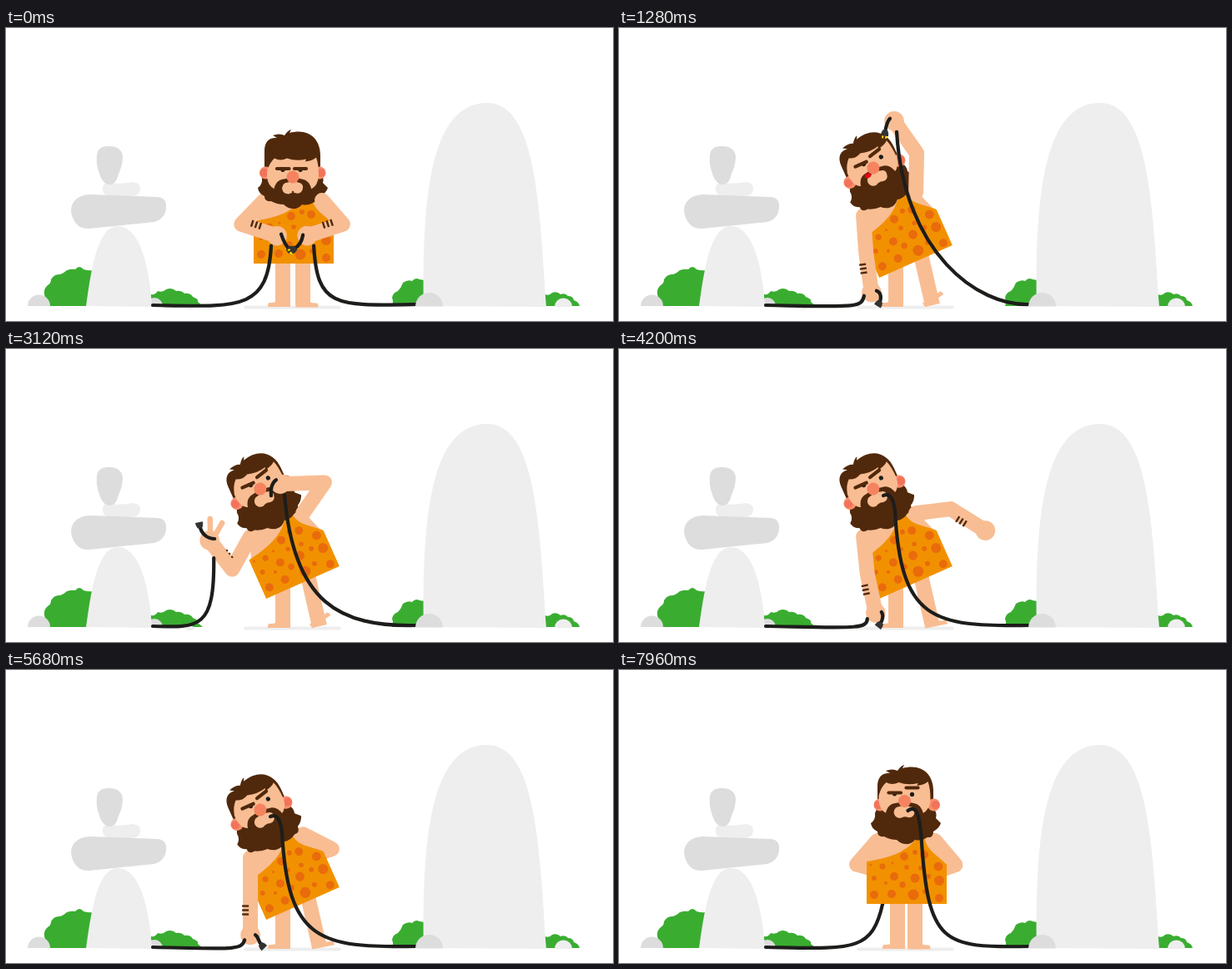
Animation, 728 px wide and 352 px high, one loop 8 s. Source, as an HTML page with a canvas:

```html
<!DOCTYPE html>
<html lang="en">
<head>
<meta charset="utf-8">
<title>Caveman and cables</title>
<style>
  html, body { margin: 0; width: 100%; height: 100%; overflow: hidden; background: #fff; }
  canvas { display: block; width: 728px; height: 352px; }
</style>
</head>
<body>
<canvas id="stage" width="728" height="352"></canvas>
<script>
const ctx = document.getElementById('stage').getContext('2d');
const LOOP = 8000;
const C = {
  skin: '#f8bd93', orange: '#f29100', spot: '#e96b0c', hair: '#50290c', nose: '#f5835f',
  ear: '#f78f6c', earIn: '#f2735a', red: '#e30613', cable: '#1d1d1b', plug: '#333', yellow: '#ffde00',
  light: '#eeeeee', grey: '#dddddd', green: '#3aad31'
};

// ---- drawing helpers
function fill(color, d) { ctx.fillStyle = color; ctx.fill(new Path2D(d)); }
function disc(color, x, y, rx, ry = rx) {
  ctx.fillStyle = color;
  ctx.beginPath();
  ctx.ellipse(x, y, rx, ry, 0, 0, 7);
  ctx.fill();
}
function dome(color, x, y, r) {
  ctx.fillStyle = color;
  ctx.beginPath();
  ctx.arc(x, y, r, Math.PI, 0);
  ctx.fill();
}
function line(color, width, points, cap = 'round') {
  ctx.strokeStyle = color;
  ctx.lineWidth = width;
  ctx.lineCap = cap;
  ctx.lineJoin = 'round';
  ctx.beginPath();
  points.forEach(([x, y]) => ctx.lineTo(x, y));
  ctx.stroke();
}
function curve(x, y, c) {
  ctx.strokeStyle = C.cable;
  ctx.lineWidth = 4.2;
  ctx.lineCap = 'round';
  ctx.beginPath();
  ctx.moveTo(x, y);
  ctx.bezierCurveTo(...c);
  ctx.stroke();
}
function at(x, y, deg, draw) {
  ctx.save();
  ctx.translate(x, y);
  ctx.rotate(deg * Math.PI / 180);
  draw();
  ctx.restore();
}
const polar = ([x, y], deg, len) =>
  [x + len * Math.cos(deg * Math.PI / 180), y + len * Math.sin(deg * Math.PI / 180)];
const offset = ([x, y], list) => list.map((v, i) => v + (i % 2 ? y : x));

// ---- motion: [time, values] keys with eased moves between them
const ease = u => u * u * (3 - 2 * u);
function sample(keys, t) {
  const i = keys.findIndex(k => k[0] > t);
  if (i === 0) return keys[0][1];
  if (i < 0) return keys[keys.length - 1][1];
  const [t0, a] = keys[i - 1], [t1, b] = keys[i];
  const u = ease((t - t0) / (t1 - t0));
  return a.map((v, n) => v + (b[n] - v) * u);
}
const between = (t, a, b) => t >= a && t < b;

// x, y, lean, head drop, look down
const bow = [345, 283, 0, 6, 1], lean = [356, 280.5, -24, 0, 0], stand = [345, 281, 0, 0, 0];
const body = [[160, bow], [660, lean], [6020, lean], [6420, stand]];

// left leg, right hip, right ankle, foot lift
const legs = [
  [160, [332, 356, 356, 0]], [660, [332, 362, 376, -36]], [3520, [332, 362, 376, -36]],
  [3800, [332, 362, 376, -11]], [6020, [332, 362, 376, -11]], [6420, [334, 355, 355, 0]]
];

// upper arm angle and length, forearm angle and length, bracelet side
const R = {
  plug: [49, 38, 162, 45, 6], high: [-89, 47, 235, 47, 15], bite: [-55, 45, 178, 53, 15],
  out: [-7, 42, 392, 49, 6], hip: [27, 39, 521, 22, 6], back: [50, 38, 520, 22, 6]
};
const rightArm = [
  [160, R.plug], [720, R.high], [1340, R.high], [1720, R.bite], [3440, R.bite],
  [3920, R.out], [4240, R.out], [4680, R.hip], [6020, R.hip], [6420, R.back]
];
const L = {
  plug: [134, 40, 18, 45, -5], down: [86, 45, 82, 48, 6], raised: [119, 45, 232, 44, 12],
  low: [84, 45, 78, 48, 6], hang: [90, 45, 90, 48, 6], back: [131, 38, 15, 22, 6]
};
const leftArm = [
  [160, L.plug], [660, L.down], [2560, L.down], [3000, L.raised], [3400, L.raised],
  [3800, L.low], [4280, L.low], [4900, L.hang], [6020, L.hang], [6420, L.back]
];

// first control x, second control, end, then the loose stub; all but the first follow the hand
const LC = {
  plug: [280, -11, 90, -7, 12, 5, -2, 7, 4, 10, 12, 15, 16],
  down: [282, -12, 19, -9, 4, 6, -2, 12, 0, 12, 8, 9, 13],
  raised: [232, 6, 106, 5, 21, 6, -2, -3, -2, -10, -8, -12, -18],
  low: [280, -10, 20, -10, 7, 7, -1, 10, 3, 8, 10, 5, 14],
  hang: [268, -10, 19, -7, 6, 6, 0, 10, 2, 9, 8, 14, 13],
  back: [280, -3, 100, 10, 41, 6, 0, 10, 2, 9, 8, 14, 13]
};
const leftCable = leftArm.map(([t, pose]) => [t, LC[Object.keys(L).find(k => L[k] === pose)]]);
const RC = {
  plug: [395, 12, 86, 8, 12, -5, -1, -6, 6, -9, 12, -16, 16],
  high: [430, 12, 159, 3, 13, -5, -3, -9, 1, -10, 7, -11, 14],
  bite: [400, 16, 143, 5, 13, -5, -5, -10, -2, -12, 6, -11, 14],
  mouth: [375, 23, 149, 16, 19, 16, 19, 14, 0, 8, -3, 2, 0],
  back: [388, 22, 161, 14, 31, 14, 31, 12, 8, 9, -8, -2, 0]
};
const rightCable = [
  [160, RC.plug], [720, RC.high], [1340, RC.high], [1720, RC.bite], [3440, RC.bite],
  [3540, RC.mouth], [6020, RC.mouth], [6420, RC.back]
];
const hold = [[3440, [1]], [3540, [0]]];

// brow lift, brow tilt, gaze, face shift
const face = [
  [160, [0, 0, 0, 0]], [620, [6, -14, 5, 0]], [6020, [6, -14, 5, 0]], [6380, [0, 0, 0, 0]],
  [7600, [0, 0, 0, 0]], [7740, [6, 0, 0, -1.5]]
];

// ---- scenery
function scenery() {
  fill(C.green, 'M46 334Q48 326 46 320Q45 313 50 309Q54 307 54 302Q58 295 65 296Q70 294 73 291Q79 289 83 290Q88 284 93 290Q100 292 104 291V334Z');
  fill(C.green, 'M174 334V320Q179 321 182 316Q188 318 192 314Q199 311 204 316Q210 315 214 319Q221 318 224 323Q232 326 230 329L236 334Z');
  fill(C.green, 'M463 334Q465 329 463 324Q464 318 470 316Q474 312 476 306Q482 302 487 304Q491 299 496 302L502 303V334Z');
  fill(C.green, 'M646 320Q652 322 655 318Q661 316 665 320Q671 318 674 322Q680 322 681 327Q687 329 688 334H646Z');
  dome(C.grey, 39.5, 334, 13.5);
  dome(C.grey, 178, 334, 10);
  fill(C.light, 'M96 334C102 290 110 238 134 238C160 238 172 285 175 335Z');
  fill(C.light, 'M121 186Q140 188 152 185Q162 186 161 194Q160 202 150 202H125Q115 201 116 192Q116 187 121 186Z');
  fill(C.grey, 'M100 200L182 203Q193 204 192 216Q191 229 178 233L100 241Q88 242 82 232Q76 221 79 213Q84 201 100 200Z');
  fill(C.grey, 'M110 148Q114 141 124 142Q138 142 140 154Q140 165 135 175Q132 188 125 188Q117 188 113 178Q106 160 110 148Z');
  fill(C.light, 'M501 334C499 200 510 90 577 90C636 90 640 215 648 335Z');
  dome(C.light, 668.5, 335, 10.5);
  disc(C.light, 220.5, 335.5, 5.5, 2.8);
  fill(C.light, 'M287 333.5H400Q404 335.5 400 337.5H287Q283 335.5 287 333.5Z');
}

// ---- character parts
const foot = 'M0 0V-6H18Q19 -5 25 -5Q27 -5 27 0Z';
function drawLegs([left, hip, ankle, lift]) {
  line(C.skin, 18, [[left, 270], [left, 333]], 'butt');
  ctx.save();
  ctx.translate(left + 9, 335);
  ctx.scale(-1, 1);
  fill(C.skin, foot);
  ctx.restore();
  line(C.skin, 18, [[hip, 272], [ankle, 333]], 'butt');
  at(ankle - 8.5, 335.5, lift, () => fill(C.skin, foot));
}

const spots = [
  [306, 270, 5], [327, 269, 5], [353, 270, 6.5], [384, 274, 5], [330, 248, 5], [306, 250, 3],
  [320, 256, 2], [340, 258, 3.7], [355, 250, 5.5], [384, 253, 6], [371, 248, 3], [342, 224, 5],
  [366, 222, 5], [355, 219, 3], [345, 237, 2.8], [316, 236, 3.6], [328, 232, 1.5], [302, 234, 1.5],
  [362, 238, 2.8], [383, 236, 5.4], [367, 266, 3]
];
function drawTorso() {
  fill(C.skin, 'M312 192H376L393 240H297Z');
  const cloth = new Path2D('M297 281V230C325 226 345 218 356 203H367C370 218 382 222 393 234V281Z');
  ctx.fillStyle = C.orange;
  ctx.fill(cloth);
  ctx.save();
  ctx.clip(cloth);
  spots.forEach(s => disc(C.spot, ...s));
  ctx.restore();
}

function drawHead(drop, look, [lift, tilt, gaze, shift], shouting) {
  ctx.save();
  ctx.translate(0, drop);
  fill(C.hair, 'M310 165V140C310 128 316 123 325 124L320 121Q328 118 334 121Q338 115 342 114L340 118C362 112 377 124 377 145V165Q382 172 380 178L386 184Q384 190 377 194Q377 202 370 201Q362 206 355 204Q350 210 344 209Q338 209 333 204Q325 204 318 200Q310 201 310 194Q303 191 302 184Q308 180 307 172Z');
  for (const [x, inner] of [[311.5, 309.5], [376, 378]]) {
    disc(C.ear, x - shift, 162 + 4 * look, 7.6);
    disc(C.earIn, inner - shift, 162 + 4 * look, 5);
  }
  ctx.translate(shift, 13.5 * look);
  fill(C.skin, 'M313 151Q316 140 322 135Q329 139 337 135Q348 139 360 136L359 139Q368 138 372 134Q375 142 375 156Q374 168 366 172H322Q314 168 313 157Z');
  fill(C.hair, 'M321 174Q323 161 333 160Q344 157 355 160Q364 161 367 174V182H321Z');
  fill(C.skin, 'M338 164Q344 161 350 164Q357 165 356 171Q355 178 348 177Q344 175 339 178Q332 178 331 171Q332 164 338 164Z');
  if (look > 0.5) disc(C.hair, 344, 175.5, 1.2);
  if (shouting) disc(C.red, 334.5, 163.5, 4, 2.8);
  disc(C.cable, 332 + gaze * 0.7, 148.8, 2.6);
  disc(C.cable, 353 + gaze, 148.8 + lift * 0.1, 2.6);
  line(C.hair, 4.2, [[325, 147.5], [339.5, 147.5]]);
  at(353, 147.5 - lift, tilt, () => line(C.hair, 4.2, [[-7, 0], [7, 0]]));
  disc(C.nose, 344, 157.5, 7.5);
  ctx.restore();
}

function solveArm(shoulder, [a, la, b, lb, side]) {
  const elbow = polar(shoulder, a, la);
  return { shoulder, elbow, hand: polar(elbow, b, lb), b, lb, side };
}
function drawArm({ shoulder, elbow, hand, b, lb, side }, banded) {
  line(C.skin, 18, [shoulder, elbow, hand]);
  disc(C.skin, ...hand, 11.8);
  if (!banded || side > 13) return;
  at(...elbow, b, () => {
    for (const d of [-5, 0, 5]) {
      const x = lb * 0.38 + d;
      line(C.hair, 2.4, [[x, side - 4], [x, Math.min(side + 4, 10)]], 'butt');
    }
  });
}

function drawPlug(stub, prongs) {
  const [cx, cy, x, y] = stub.slice(4);
  at(x, y, Math.atan2(y - cy, x - cx) * 180 / Math.PI, () => {
    if (prongs) line(C.yellow, 2, [[3, -2], [7, -2]], 'butt'), line(C.yellow, 2, [[3, 2], [7, 2]], 'butt');
    fill(C.plug, 'M-3 -3Q1 -5 4 -4.5V4.5Q1 5 -3 3Z');
  });
}
function drawCable(startX, startY, anchor, c, loose) {
  const [c2x, c2y, ex, ey, ...stub] = offset(anchor, c.slice(1));
  curve(startX, startY, [c[0], startY + 2, c2x, c2y, ex, ey]);
  if (!loose) return;
  curve(stub[0], stub[1], stub.slice(2));
  return stub;
}

// ---- one picture at time t
function draw(t) {
  const [x, y, angle, baseDrop, look] = sample(body, t);
  const tug = between(t, 1720, 2520) ? 1.4 : between(t, 6760, 7560) ? 0.6 : 0;
  const drop = baseDrop - tug * Math.sin((t - 1720) / 400 * Math.PI * 2) ** 2;
  const rad = angle * Math.PI / 180, cos = Math.cos(rad), sin = Math.sin(rad);
  const toStage = (px, py) => {
    const dx = px - 345, dy = py - 281;
    return [x + dx * cos - dy * sin, y + dx * sin + dy * cos];
  };
  const onBody = part => at(x, y, angle, () => { ctx.translate(-345, -281); part(); });

  const right = solveArm(toStage(379, 205), sample(rightArm, t));
  const left = solveArm(toStage(310, 205), sample(leftArm, t));
  const rightFront = t < 4500, leftFront = t < 6240;
  const features = sample(face, t);

  const mouth = toStage(350 + features[3], 169);
  const [held] = sample(hold, t);
  const anchor = mouth.map((v, i) => v + (right.hand[i] - v) * held);
  const leftWire = () => drawCable(176, 333, left.hand, sample(leftCable, t), leftFront);

  ctx.fillStyle = '#fff';
  ctx.fillRect(0, 0, 728, 352);
  scenery();
  if (!leftFront) leftWire();
  drawLegs(sample(legs, t));
  if (!rightFront) drawArm(right, false);
  if (!leftFront) drawArm(left, false);
  onBody(drawTorso);
  if (leftFront) {
    drawArm(left, true);
    const spread = Math.min(1, Math.max(0, Math.min((t - 2800) / 160, (3520 - t) / 140)));
    if (spread > 0) {
      const [hx, hy] = left.hand;
      line(C.skin, 6.5, [[hx + 1, hy], [hx + 0.5, hy - 26 * spread]]);
      line(C.skin, 6.5, [[hx + 3, hy], [hx + 3 + 12 * spread, hy - 21 * spread]]);
    }
  }
  onBody(() => drawHead(drop, look, features, between(t, 860, 1500)));
  if (rightFront) drawArm(right, true);
  if (leftFront) drawPlug(leftWire(), t < 400);
  const stub = drawCable(492, 332, anchor, sample(rightCable, t), true);
  if (t < 1560) drawPlug(stub, true);
  dome(C.grey, 507.5, 334.5, 16.5);
}

const start = performance.now();
function tick() {
  draw((performance.now() - start) % LOOP);
  requestAnimationFrame(tick);
}
tick();
</script>
</body>
</html>
```
